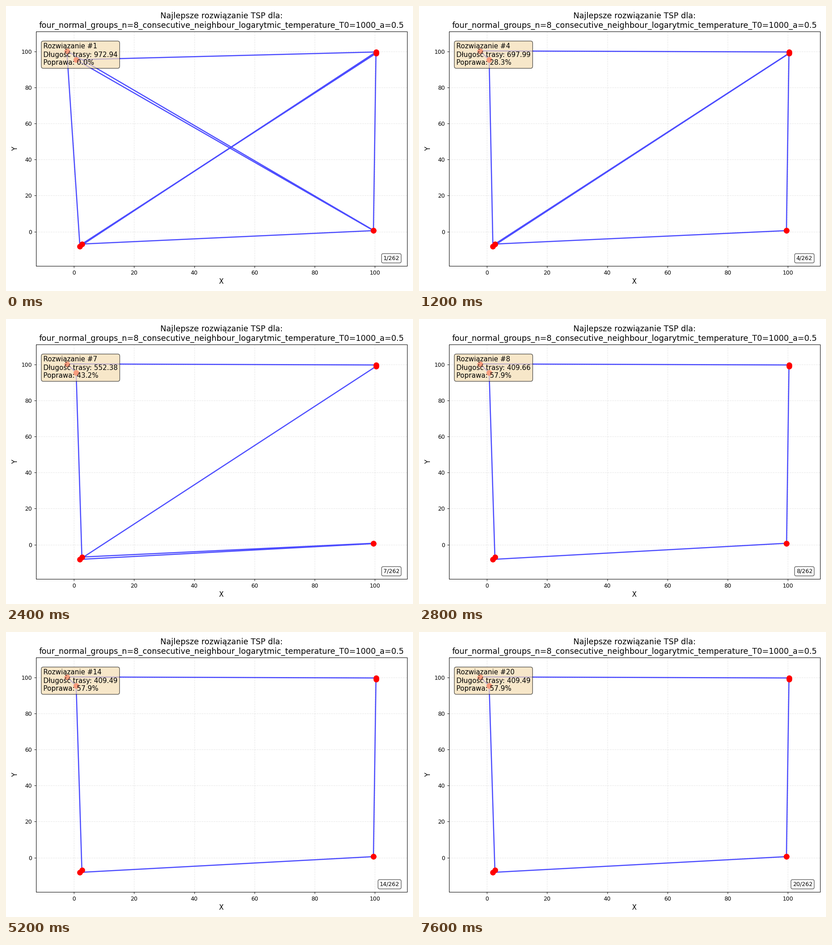
Animation, 894 px wide and 626 px high, one loop 8000 ms. Source, as a matplotlib script:

```python
import matplotlib.pyplot as plt
from matplotlib.animation import FuncAnimation

WIDTH, HEIGHT, DPI = 894, 626, 89.4
STEPS, TOTAL, INTERVAL = 20, 262, 400

CITIES = {
    "A": (-2.35, 100.3), "B": (0.75, 95.4),
    "C": (100.35, 99.7), "D": (100.35, 98.9),
    "U": (99.5, 0.75), "L": (99.55, 0.55),
    "G": (2.65, -6.9), "H": (2.0, -8.2),
}
# Successive best tours with their lengths; the last one holds.
TOURS = [
    ("AHCBLGDU", 972.94), ("ACBLGDUH", 885.09), ("ACULGDBH", 754.90),
    ("ACULGDHB", 697.99), ("AHCDUGLB", 690.60), ("AHCDULGB", 559.00),
    ("ACDHLUGB", 552.38), ("ACDLUHGB", 409.66), ("ACDULHGB", 409.49),
]


def padded_limits(values, share=0.1):
    low, high = min(values), max(values)
    margin = share * (high - low)
    return low - margin, high + margin


fig, ax = plt.subplots(figsize=(WIDTH / DPI, HEIGHT / DPI), dpi=DPI,
                       facecolor="white")

xs, ys = zip(*CITIES.values())
ax.set_xlim(*padded_limits(xs))
ax.set_ylim(*padded_limits(ys))
ax.set_xticks(range(0, 101, 20))
ax.set_yticks(range(0, 101, 20))
ax.grid(True, linestyle="--", alpha=0.3)
ax.set_xlabel("X", fontsize=12)
ax.set_ylabel("Y", fontsize=12)
ax.set_title("Najlepsze rozwiązanie TSP dla:\n"
             "four_normal_groups_n=8_consecutive_neighbour_"
             "logarytmic_temperature_T0=1000_a=0.5", fontsize=14)
fig.tight_layout()

route, = ax.plot([], [], "b-", linewidth=2, alpha=0.7)
ax.plot(xs, ys, "ro", markersize=9)
info = ax.text(0.02, 0.95, "", transform=ax.transAxes, fontsize=12, va="top",
               bbox=dict(boxstyle="round", facecolor="wheat", alpha=0.7))
counter = ax.text(0.98, 0.02, "", transform=ax.transAxes, fontsize=10,
                  ha="right", va="bottom",
                  bbox=dict(boxstyle="round", facecolor="white", alpha=0.7))


def update(step):
    tour, length = TOURS[min(step, len(TOURS) - 1)]
    route.set_data(*zip(*(CITIES[name] for name in tour + tour[0])))
    gain = 100 * (1 - length / TOURS[0][1])
    info.set_text(f"Rozwiązanie #{step + 1}\n"
                  f"Długość trasy: {length:.2f}\n"
                  f"Poprawa: {gain:.1f}%")
    counter.set_text(f"{step + 1}/{TOTAL}")
    return route, info, counter


anim = FuncAnimation(fig, update, frames=STEPS, interval=INTERVAL,
                     repeat=True, repeat_delay=0)
plt.show()
```
